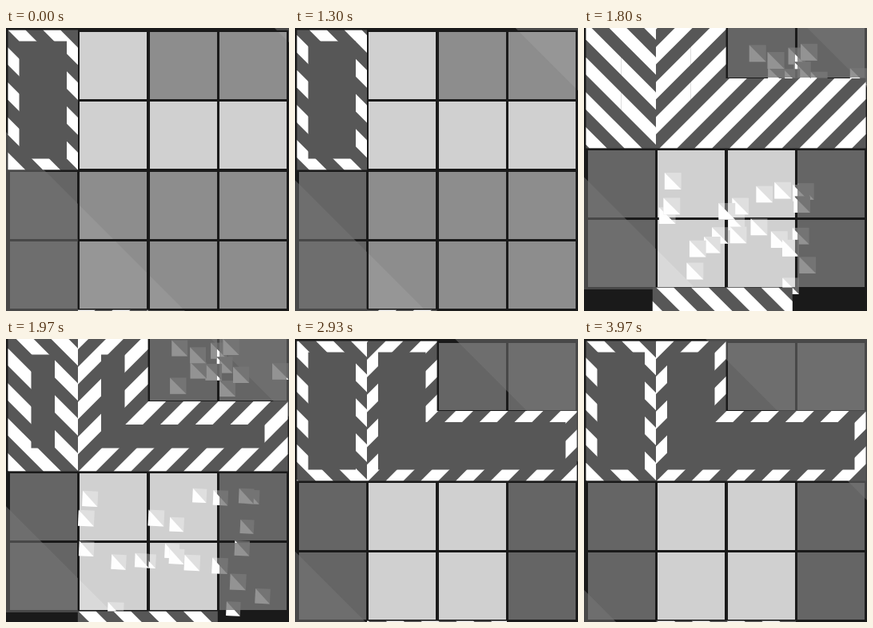
An HTML page with a canvas that plays this animation: 354 by 354 pixels, repeating every 4010 ms.

```html
<!DOCTYPE html>
<html>
<head>
<meta charset="utf-8">
<style>
html, body { margin: 0; width: 100%; height: 100%; overflow: hidden; background: #1a1a1a; }
canvas { display: block; }
</style>
</head>
<body>
<canvas id="stage" width="354" height="354"></canvas>
<script>
const ctx = document.getElementById('stage').getContext('2d');
const LOOP = 4010, CELL = 87.5, EDGE = 2.5, BAND = 14, STRIPE = CELL / 2;
const LAUNCH = 1602, IMPACT = 1742;

// Corners in cells, each with the direction that points inwards.
const DOMINO = [[0, 0, 1, 1], [1, 0, -1, 1], [1, 2, -1, -1], [0, 2, 1, -1]];
const ELL = [[0, 0, 1, 1], [1, 0, -1, 1], [1, 1, -1, 1], [3, 1, -1, 1], [3, 2, -1, -1], [0, 2, 1, -1]];
const BLOCK = [[0, 0, 1, 1], [2, 0, -1, 1], [2, 2, -1, -1], [0, 2, 1, -1]];

const clamp = (v, a = 0, b = 1) => Math.min(b, Math.max(a, v));
const decay = (t, from, tau) => t < from ? 0 : Math.exp((from - t) / tau);

let seed = 11;
const random = (a, b) => {
  seed = seed * 16807 % 2147483647;
  return a + (b - a) * seed / 2147483647;
};

// The first chips are torn off by the launch, every third by the impact.
const chips = Array.from({ length: 33 }, (_, i) => {
  const late = i % 3 === 2;
  const x = late ? random(180, 345) : random(100, 330);
  const y = late ? random(5, 70) : random(195, 345);
  return {
    x, y,
    born: late ? IMPACT : LAUNCH + 30,
    fromX: late ? x : random(100, 170),
    fromY: late ? y + 60 : random(190, 340),
    driftX: random(-30, 15), driftY: random(-15, 30),
    life: 600 + 420 * random(0, 1) ** 2
  };
});

function polygon(points, path = new Path2D()) {
  points.forEach(([x, y], i) => i ? path.lineTo(x, y) : path.moveTo(x, y));
  path.closePath();
  return path;
}

function fill(shape, color) {
  ctx.fillStyle = color;
  ctx.fill(shape);
}

function piece(shape, x, y, slant, band, t) {
  const corners = inset => shape.map(([cx, cy, dx, dy]) => [cx * CELL + dx * inset, cy * CELL + dy * inset]);
  const body = polygon(corners(0));
  const height = 2 * CELL, lean = slant * height, scroll = -CELL * t / LOOP;
  ctx.save();
  ctx.translate(x, y);
  fill(body, '#575757');
  ctx.clip(polygon(corners(band), polygon(corners(0))), 'evenodd');
  for (let k = -5; k < 14; k++) {
    const left = k * STRIPE + scroll, right = left + STRIPE / 2;
    fill(polygon([[left, 0], [right, 0], [right + lean, height], [left + lean, height]]), '#fff');
  }
  ctx.restore();
}

function eachCell(launched, paint) {
  for (let r = 0; r < 4; r++) for (let c = 0; c < 4; c++) {
    const target = launched ? r > 1 && (c === 1 || c === 2) : c > 0 && (r === 1 || r === 0 && c === 1);
    const lane = !launched && c > 0;
    paint(Math.round(4.5 + c * CELL), Math.round(4.5 + r * CELL), target, lane);
  }
}

function sheen(t) {
  const low = 130 + 0.0463 * t, high = 466 - low;
  const shape = polygon([[-50, low - 50], [450, low + 450], [-50, low + 450]]);
  polygon([[high - 50, -50], [450, -50], [450, 450 - high]], shape);
  ctx.save();
  ctx.beginPath();
  ctx.rect(0, 0, 354, 354);
  ctx.clip();
  fill(shape, '#484848');
  ctx.restore();
}

function debris(t) {
  for (const p of chips) {
    const age = t - p.born;
    if (age < 0 || age > p.life) continue;
    const out = 1 - (1 - clamp(age / 300)) ** 2;
    const late = clamp((age - 300) / 500);
    const h = 10.5 * (1 - (age / p.life) ** 3);
    ctx.save();
    ctx.translate(p.fromX + (p.x - p.fromX) * out + p.driftX * late,
                  p.fromY + (p.y - p.fromY) * out + p.driftY * late + 12);
    ctx.rotate(late * 0.6);
    ctx.fillStyle = '#666';
    ctx.fillRect(-h, -h, 2 * h, 2 * h);
    fill(polygon([[-h, -h], [h, h], [-h, h]]), '#fff');
    ctx.restore();
  }
}

function board(t) {
  const launched = t >= LAUNCH;
  sheen(t);
  ctx.strokeStyle = '#1a1a1a';
  ctx.lineWidth = 2;
  eachCell(launched, (x, y, target, lane) => {
    if (target || lane) ctx.strokeRect(x - 1, y - 1, 86, 86);
  });
  debris(t);
  // Translucent tiles let the sheen and the chips shine through.
  ctx.globalAlpha = 0.8;
  eachCell(launched, (x, y, target, lane) => {
    ctx.fillStyle = target ? '#fefefe' : lane ? '#ababab' : '#797979';
    ctx.fillRect(x, y, 84, 84);
  });
  ctx.globalAlpha = 1;
}

function draw(t) {
  const pulse = t < IMPACT ? 0 : (1 - clamp((t - IMPACT) / 550)) ** 2;
  const band = Math.min(BAND + 44 * pulse, STRIPE - 0.1);
  ctx.fillStyle = '#1a1a1a';
  ctx.fillRect(0, 0, 354, 354);
  ctx.save();
  ctx.translate(0, -Math.round(35 * decay(t, IMPACT, 213)));
  board(t);
  if (t >= LAUNCH) {
    const enter = decay(t, LAUNCH, 53);
    piece(BLOCK, EDGE + CELL - 180 * enter, EDGE + 4 * CELL - 48 * enter, 1, band, t);
  }
  const rise = clamp((t - LAUNCH) / (IMPACT - LAUNCH));
  piece(ELL, EDGE + CELL, EDGE + 4 * CELL * (1 - rise), -1, band, t);
  piece(DOMINO, EDGE, EDGE, 1, band, t);
  ctx.restore();
}

const start = performance.now();
function tick() {
  draw((performance.now() - start) % LOOP);
  requestAnimationFrame(tick);
}
tick();
</script>
</body>
</html>
```
